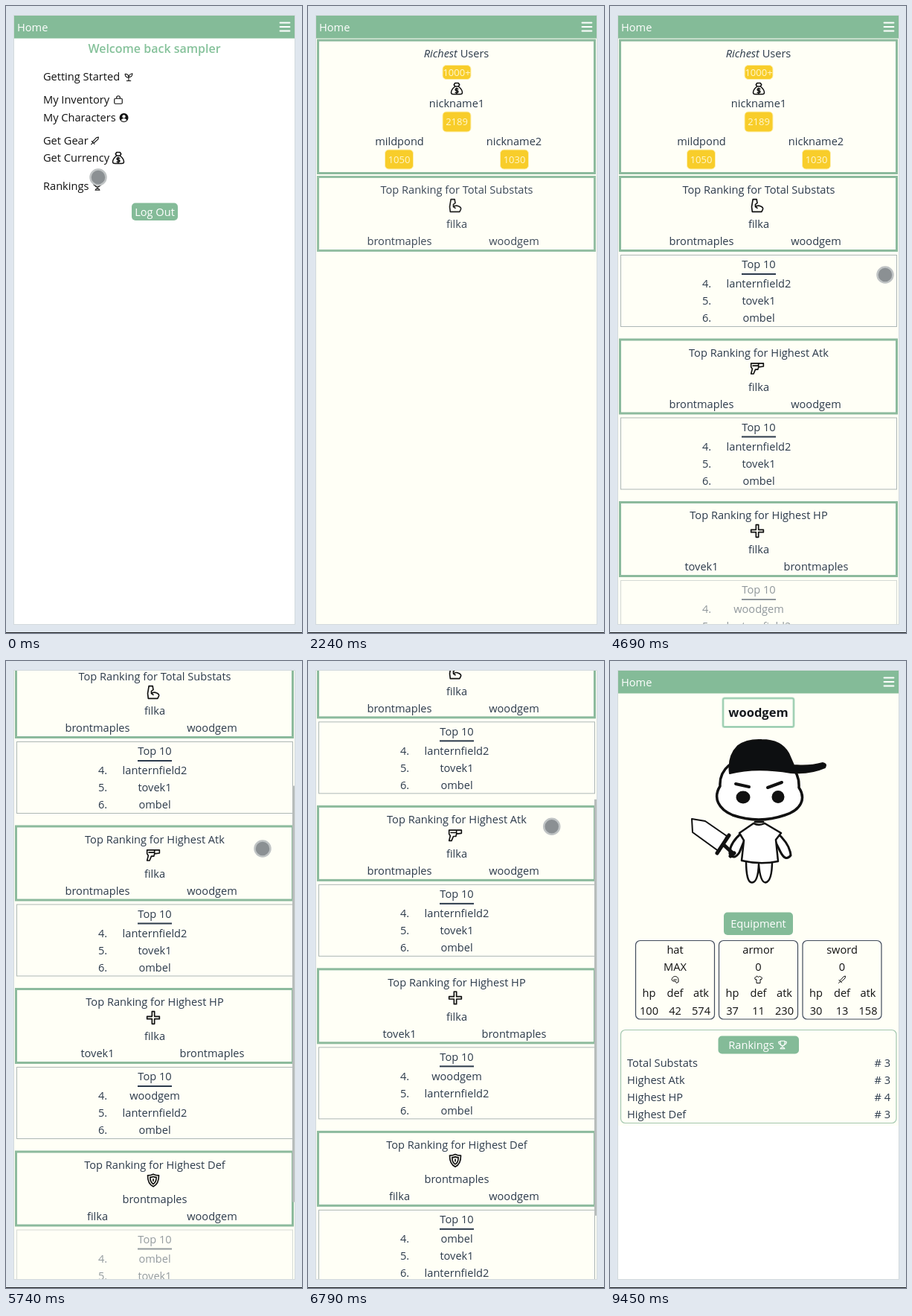
An HTML page for the animation above (9520 ms loop, 398 by 842 pixels).

```html
<!DOCTYPE html>
<html lang="en">
<head>
<meta charset="utf-8">
<title>Rankings demo</title>
<style>
  html, body { margin: 0; width: 100%; height: 100%; overflow: hidden; background: #dfe6ee; }
  svg { display: block; width: 100%; height: 100%; }
  text { font: 14.6px "Open Sans", "Noto Sans", sans-serif; white-space: pre; }
</style>
</head>
<body>
<svg id="stage" viewBox="0 0 398 842"></svg>
<script>
const LOOP = 9520, STEP = 70;
const GREEN = '#84bb98', INK = '#2c3a4b', CREAM = '#fffff6';

const icons = {
  money: 'M9 2h6l2 3-2 3H9L7 5zM9 8C4 12 2 16 2 19q0 3 4 3h12q4 0 4-3c0-3-2-7-7-11M14.5 12.5q-5-1.5-5 1t2.5 2 2.5 2-5 1.5M12 11v10',
  sprout: 'M12 22V12M12 14C5 14 3 9 3 5c6 0 9 3 9 9 0-6 3-9 9-10 0 6-3 9-9 9M7 22h10',
  handbag: 'M5 9h14q2 0 2 2v8q0 2-2 2H5q-2 0-2-2v-8q0-2 2-2zM8 9V7a4 4 0 0 1 8 0v2',
  person: 'M12 1a11 11 0 1 0 .1 0zM12 5a4 4 0 1 1-.1 0zM5 18q2-4 7-4t7 4q-3 3-7 3t-7-3z',
  sword: 'M21 3l-1 5L9 18l-3-3L16 4zM4 13l7 7M7 17l-4 4',
  trophy: 'M7 3h10v6a5 5 0 0 1-10 0zM7 5H3q0 6 5 6M17 5h4q0 6-5 6M12 14v4M7 21l2-3h6l2 3z',
  arm: 'M5 2h6l1 6-3 2v4q4-3 8-1 5 2 4 5l-2 4H4L3 14zM9 14l3 2',
  gun: 'M2 4h20v5l-8 1-1 4H9l-3 7H2l2-8-2-3zM14 4v5M5 8h9',
  plus: 'M10 2h4v8h8v4h-8v8h-4v-8H2v-4h8z',
  shield: 'M12 2q4 2 9 2 0 14-9 18Q3 18 3 4q5 0 9-2zM12 6q3 1 5 1 0 8-5 11-5-3-5-11 2 0 5-1zM12 10v3',
  helm: 'M3 12a9 9 0 0 1 18 0v6l-5 3-3-5H8zM8 12h8',
  shirt: 'M8 3L2 7l2 5 3-1v10h10V11l3 1 2-5-6-4q-4 4-8 0z'
};

// Text is placed by the vertical centre of its capitals.
const text = (s, x, y, { fill = INK, anchor = 'middle', style = '' } = {}) =>
  `<text x="${x}" y="${y + 5.3}" fill="${fill}" text-anchor="${anchor}" style="${style}">${s}</text>`;
const left = (s, x, y, fill = INK) => text(s, x, y, { fill, anchor: 'start' });
const rect = (x1, y1, x2, y2, fill, rx = 0, stroke = 'none', width = 1) =>
  `<rect x="${x1}" y="${y1}" width="${x2 - x1}" height="${y2 - y1}" rx="${rx}" fill="${fill}" stroke="${stroke}" stroke-width="${width}"/>`;
const path = (d, fill = 'none', stroke = '#111', width = 2) =>
  `<path d="${d}" fill="${fill}" stroke="${stroke}" stroke-width="${width}" stroke-linejoin="round" stroke-linecap="round"/>`;
const icon = (name, x, y, size, color = '#111') =>
  `<g transform="translate(${x - size / 2} ${y - size / 2}) scale(${size / 24})">` +
  (name === 'person' ? `<path d="${icons[name]}" fill="${color}" fill-rule="evenodd"/>` : path(icons[name], 'none', color)) + '</g>';
const group = (id, body) => `<g id="${id}">${body}</g>`;

const nav = rect(11, 13, 388, 43.5, GREEN) + left('Home', 15, 29, '#fff') +
  path('M368.5 22.5h13M368.5 28h13M368.5 33.5h13', 'none', '#fff', 1.8);

function homePage() {
  const links = [
    ['Getting Started', 95, 'sprout', 165, 13], ['My Inventory', 126, 'handbag', 151, 14],
    ['My Characters', 150, 'person', 158.5, 13], ['Get Gear', 181, 'sword', 119.5, 13],
    ['Get Currency', 204, 'money', 151, 18], ['Rankings', 242, 'trophy', 123, 14]
  ];
  return rect(11, 13, 388, 830, '#fff') + nav +
    text('Welcome back sampler', 199.5, 58, { fill: '#86c29b', style: 'font-size:16px;font-weight:600' }) +
    links.map(([s, y, name, x, size]) => left(s, 50, y, '#111') + icon(name, x, y, size)).join('') +
    rect(169, 264.5, 231, 288, GREEN, 5) + text('Log Out', 200, 277, { fill: '#fff' });
}

const badge = (n, x, y, h) => rect(x - 19, y - h / 2, x + 19, y + h / 2, '#f8cd2a', 5, '#fdf0b0', 1) +
  text(n, x, y - .5, { fill: '#fff7cf', style: 'font-size:13px' });
const frame = (y1, y2) => rect(13.5, y1, 385.5, y2, CREAM, 0, '#8cba9d', 3);

const richest = frame(46, 224.5) +
  text('<tspan font-style="italic">Richest</tspan> Users', 199.5, 63.5) +
  badge('1000+', 200, 89, 19) + icon('money', 200, 111, 18) +
  text('nickname1', 200, 131) + badge('2189', 200, 155.5, 27) +
  text('mildpond', 123, 181.5) + badge('1050', 122.5, 206, 26) +
  text('nickname2', 277, 181.5) + badge('1030', 277.5, 206, 26);

const A = 'filka', B = 'brontmaples', C = 'woodgem', D = 'lanternfield2', E = 'tovek1', F = 'ombel';
const boards = [
  ['Total Substats', 'arm', [A, B, C], [D, E, F]],
  ['Highest Atk', 'gun', [A, B, C], [D, E, F]],
  ['Highest HP', 'plus', [A, E, B], [C, D, F]],
  ['Highest Def', 'shield', [B, A, C], [F, E, D]]
];
const podium = ([title, name, [first, second, third]], y) => frame(y + 229.5, y + 328.5) +
  text('Top Ranking for ' + title, 200, y + 247) + icon(name, 198, y + 268, 20) +
  text(first, 200, y + 293) + text(second, 123, y + 316) + text(third, 277, y + 316);
const topTen = (names, y) => rect(14.5, y + 334.5, 385.5, y + 430.5, CREAM, 0, '#adb7b6') +
  text('Top 10', 200, y + 347) + rect(177, y + 359, 223, y + 361, INK) +
  names.map((s, i) => text(i + 4 + '.', 130, y + 373 + i * 23) + text(s, 200, y + 373 + i * 23)).join('');

const search = rect(104.5, 1105, 295, 1160, CREAM, 5, '#455062', 1.2) +
  left('Search Character by Name', 109, 1118) +
  rect(106, 1130, 294, 1152, '#fff') + left('Character Name', 109, 1141, '#a3a9ad');

const sections = [richest];
boards.forEach((board, i) => {
  const y = i * 218.5;
  sections.push(podium(board, y), topTen(board[3], y));
});
sections.push(search);

const rankingsButton = y => rect(145.5, y - 12, 254, y + 12, GREEN, 5) + text('Rankings', 190, y, { fill: '#fff' });

const loadingPage = rect(11, 13, 388, 830, '#fff') + rect(11, 43, 388, 137, CREAM) + nav +
  left('Loading...', 11.5, 57, '#111') + rect(14.5, 78.5, 385, 133.5, CREAM, 6, '#a4aaa8') +
  rankingsButton(98) + left('loading...', 15, 121, '#111');

const hero = rect(152, 50, 247, 88.5, CREAM, 2, '#b9dfc8', 3) + rect(152, 50, 247, 88.5, 'none', 2, '#8cc3a2', 1) +
  text(C, 199.5, 70, { fill: '#15191d', style: 'font-size:16.5px;font-weight:700' }) +
  path('M183 268Q183 298 191 297.500Q199 297 200 273Q202 297 209 297.500Q218 296 218 268Z', '#fff', '#111', 2.5) +
  path('M178 230Q160 245 161 259Q167 268 174 257L181 240ZM224 230Q242 246 243 261Q236 270 229 256L221 240Z', '#fff', '#111', 3) +
  path('M193 218L174 231L180 241L177 268Q202 274 226 269L223 240L230 231L208 218Q200 222 193 218Z', '#fff', '#111', 2.5) +
  path('M110 212L128 215L157 235L147 256L111 230Z', '#fff', '#111', 2) +
  path('M144 258L160 234M152 246L165 258M162 262L167 258', 'none', '#111', 5) +
  path('M160 140Q147 151 148 168C138 184 146 199 165 207Q200 219 235 207C257 200 264 185 254 170Q255 152 243 141Z', '#fff', '#111', 3.5) +
  path('M161 151Q158 128 172 114Q184 105 204 106Q230 106 240 124L247 140Q268 142 286 137Q292 138 289 143Q268 152 243 150Q196 142 161 151Z', '#0d0f11') +
  path('M169 165L187 169M212 170L231 163', 'none', '#111', 4) +
  '<ellipse cx="179" cy="183" rx="9.500" ry="8.500" fill="#111"/><ellipse cx="226" cy="182.500" rx="8.500" ry="8.500" fill="#111"/>' +
  path('M195 216h11', 'none', '#111', 3);

const card = (x, title, level, name, stats) => rect(x - 53, 375.5, x + 53, 481, CREAM, 6, '#414b5c', 1.2) +
  text(title, x, 388, { fill: '#111' }) + text(level, x, 411, { fill: '#111' }) + icon(name, x, 428, 12) +
  ['hp', 'def', 'atk'].map((s, i) => text(s, x - 35 + i * 35, 446, { fill: '#111' }) +
    text(stats[i], x - 35 + i * 35, 469.5, { fill: '#111' })).join('');

const gear = rect(153, 337.5, 246, 368, GREEN, 5) + text('Equipment', 199.5, 353, { fill: '#fff' }) +
  card(87.5, 'hat', 'MAX', 'helm', [100, 42, 574]) +
  card(199.5, 'armor', '0', 'shirt', [37, 11, 230]) +
  card(312, 'sword', '0', 'sword', [30, 13, 158]);

const places = rect(14.5, 495.5, 385, 620.5, CREAM, 6, '#a3c7b0', 1.2) +
  rankingsButton(515.5) + icon('trophy', 232, 515.5, 14, '#fff') +
  boards.map(([title], i) => left(title, 23, 540 + i * 23) +
    text('# ' + [3, 3, 4, 3][i], 377, 540 + i * 23, { anchor: 'end' })).join('');

const stage = document.getElementById('stage');
stage.innerHTML = '<defs><clipPath id="screen">' + rect(11, 13, 388, 830, '#000') + '</clipPath></defs>' +
  rect(0, 0, 398, 842, '#dfe6ee') + rect(0, 841, 398, 842, '#1c1f22') +
  '<g clip-path="url(#screen)">' +
  group('home', homePage()) +
  group('rankings', rect(11, 13, 388, 830, CREAM) +
    group('scroller', nav + sections.map((s, i) => group('section' + i, s)).join('')) +
    group('thumb', rect(385, 13, 388, 572, '#b7bcbb'))) +
  group('loading', loadingPage) +
  group('character', rect(11, 13, 388, 830, '#fff') + rect(11, 43, 388, 624, CREAM) + nav +
    group('hero', hero) + group('gear', gear) + group('places', places)) +
  '</g>' + rect(10.5, 12.5, 388.5, 830.5, 'none', 0, '#d3dadd') +
  group('pointer', '<circle r="10.500" fill="#8b9093" stroke="#bfc3c4" stroke-width="2.500"/>');

const el = id => document.getElementById(id);
const clamp = v => Math.max(0, Math.min(1, v));
const fade = (t, start, length = 500) => clamp((t - start) / length);

// Rows: time, then values.
const pointerSteps = [
  [0, 124, 230, 1], [280, 117, 242, 1], [420, 117, 242, 1], [490, 117, 242, 0],
  [4200, 372, 376, 0], [4270, 371, 372, 1], [4690, 370, 361, 1], [5250, 350, 275, 1],
  [5460, 350, 275, 1], [5740, 345, 252, 1], [6510, 337, 173, 1], [6650, 337, 173, 1],
  [7210, 300, 370, 1], [7420, 274, 320, 1], [8050, 274, 320, 1], [8190, 274, 320, 0], [LOOP, 274, 320, 0]
];
const scrollSteps = [
  [0, 0], [4760, 0], [5250, 140], [5460, 140], [5740, 226], [6510, 322], [6650, 322], [7300, 0], [LOOP, 0]
];

function sample(steps, t) {
  const i = steps.findIndex(row => row[0] > t);
  const a = steps[i - 1], b = steps[i], k = (t - a[0]) / (b[0] - a[0]);
  return a.slice(1).map((v, j) => v + (b[j + 1] - v) * k);
}

const show = (id, opacity) => {
  el(id).style.display = opacity > 0 ? '' : 'none';
  el(id).style.opacity = opacity;
};

function draw(t) {
  show('home', t < 1260);
  show('rankings', t >= 1260 && t < 7560);
  show('loading', t >= 7560 && t < 8050);
  show('character', t >= 8050);

  sections.forEach((_, i) => show('section' + i, fade(t, 1250 + i * 530)));
  const [scroll] = sample(scrollSteps, t);
  el('scroller').setAttribute('transform', `translate(0 ${-scroll})`);
  el('thumb').setAttribute('transform', `translate(0 ${scroll * .684})`);
  show('thumb', t > 4760 ? 1 - fade(t, 7300, 200) : 0);

  show('hero', fade(t, 7980, 280));
  show('gear', fade(t, 7980, 350));
  show('places', fade(t, 7980, 420));

  const [x, y, opacity] = sample(pointerSteps, t);
  el('pointer').setAttribute('transform', `translate(${x} ${y})`);
  show('pointer', opacity);
}

const start = performance.now();
function tick() {
  const t = (performance.now() - start) % LOOP;
  draw(Math.floor(t / STEP) * STEP);
  requestAnimationFrame(tick);
}
tick();
</script>
</body>
</html>
```
